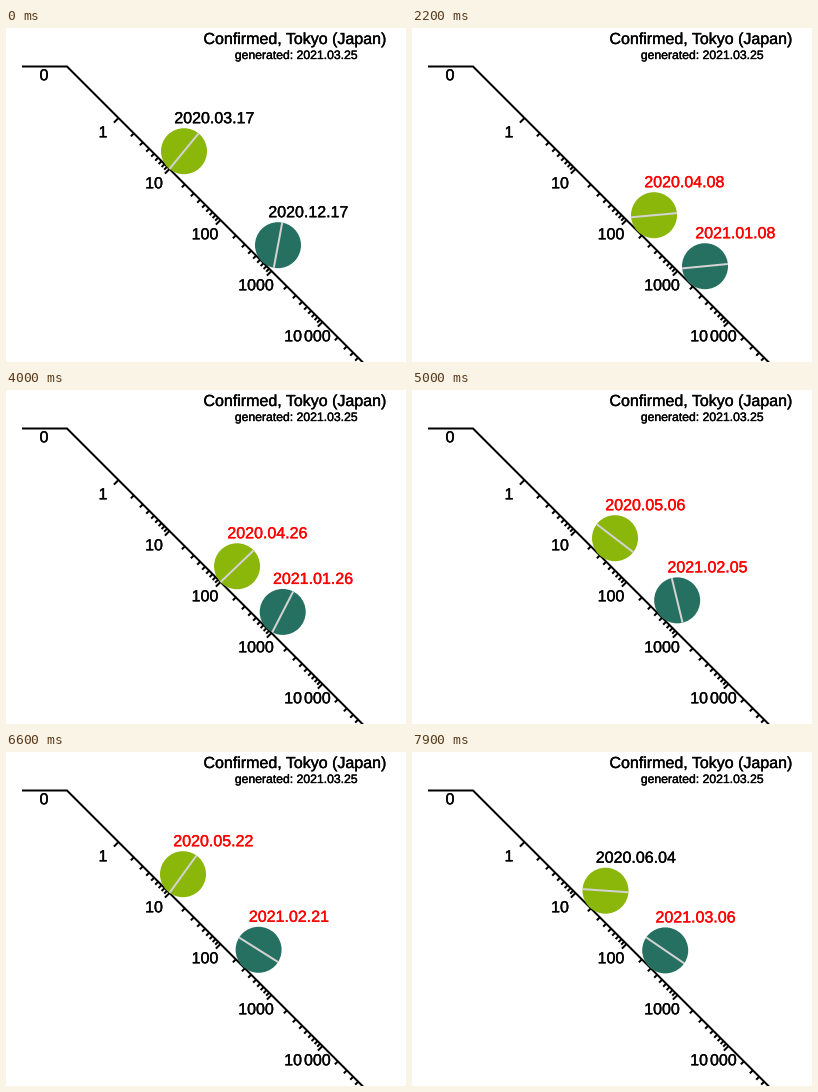
Animation of 400 by 334 pixels, one loop 8000 ms. Source, as a matplotlib script:

```python
import matplotlib.pyplot as plt
import numpy as np
from matplotlib.animation import FuncAnimation
from matplotlib.patches import Circle
from matplotlib.patheffects import withStroke

W, H, DPI = 400, 334, 100
DAYS, STEP_MS = 80, 100
PX = 72 / DPI

CORNER = (61, 38.5)    # where the axis turns downhill
ONE = 112.5            # x of the "1" tick
DECADE = 51            # x distance per factor of ten
RADIUS = 23
BALL_ONE = 128.5       # ball centre x for a value of 1
BALL_DROP = 54.8       # ball centre x minus centre y

# Turning points of each run: (day, x of the ball centre)
SPRING = [(0, 178), (1, 179.5), (3, 195.3), (5, 206), (9, 217.5), (12, 225),
          (18, 238), (22, 242), (26, 241), (36, 233.5), (45, 228), (50, 203),
          (58, 182.2), (61, 168), (66, 177), (73, 193), (76, 196), (79, 193.5)]
WINTER = [(0, 272), (12, 280.5), (14, 283.5), (17, 293.4), (19, 295.2),
          (22, 293), (28, 291), (36, 281.7), (45, 270.5), (55, 259.8),
          (60, 258), (66, 252.6), (79, 253.2)]

plt.rcParams["font.family"] = "Liberation Sans"
plt.rcParams["text.hinting"] = "none"
plt.rcParams["text.hinting_factor"] = 1

fig = plt.figure(figsize=(W / DPI, H / DPI), dpi=DPI, facecolor="white")
ax = fig.add_axes([0, 0, 1, 1])
ax.set(xlim=(0, W), ylim=(H, 0))
ax.axis("off")


def embolden(text, color):
    text.set_color(color)
    text.set_path_effects([withStroke(linewidth=0.35 * PX, foreground=color)])


def label(x, y, s, size=16, ha="center", **kw):
    text = ax.text(x, y, s, fontsize=size * PX, ha=ha, va="baseline", **kw)
    embolden(text, "black")
    return text


def stroke(xs, ys, width=2, color="black", **kw):
    return ax.plot(xs, ys, color=color, lw=width * PX,
                   solid_capstyle="butt", **kw)[0]


def slope_point(value):
    x = ONE + DECADE * np.log10(value)
    return x, x - CORNER[0] + CORNER[1]


def draw_axis():
    x0, y0 = CORNER
    stroke([16, x0, x0 + 320], [y0, y0, y0 + 320], solid_joinstyle="miter")
    label(38, y0 + 13.8, "0")
    for power in range(5):
        for k in range(1, 10):
            x, y = slope_point(k * 10 ** power)
            size = 4.6 if k == 1 else 3
            stroke([x, x - size], [y, y + size])
        x, y = slope_point(10 ** power)
        x, y = x - 15.5, y + 19.3
        if power < 4:
            label(x, y, str(10 ** power))
        else:
            label(x - 5, y, "10", ha="right")
            label(x - 3, y, "000", ha="left")


class Ball:
    def __init__(self, start, path, color, alert):
        self.start = np.datetime64(start)
        self.alert = [np.datetime64(d) for d in alert]
        self.xs = np.interp(np.arange(DAYS), *zip(*path))
        self.disc = ax.add_patch(Circle((0, 0), RADIUS, fc=color, lw=0, zorder=3))
        self.spoke = stroke([], [], color="lightgray", zorder=4)
        self.date = label(0, 0, "", ha="left", zorder=5)

    def show(self, i):
        x = self.xs[i]
        y = x - BALL_DROP
        # Rolling without slipping down a 45 degree slope
        turn = np.pi / 4 - (x - BALL_ONE) * np.sqrt(2) / RADIUS
        dx, dy = RADIUS * np.cos(turn), RADIUS * np.sin(turn)
        self.disc.center = x, y
        self.spoke.set_data([x - dx, x + dx], [y + dy, y - dy])

        day = self.start + i
        first, last = self.alert
        self.date.set_text(str(day).replace("-", "."))
        self.date.set_position((x - 9.7, y - 28))
        embolden(self.date, "red" if first <= day <= last else "black")
        return self.disc, self.spoke, self.date


draw_axis()
label(289.5, 16, "Confirmed, Tokyo (Japan)")
label(289.2, 31, "generated: 2021.03.25", size=12.2)

balls = [
    Ball("2020-03-17", SPRING, "#8bb60a", ("2020-04-07", "2020-05-25")),
    Ball("2020-12-17", WINTER, "#267061", ("2021-01-08", "2021-03-21")),
]


def update(i):
    return [part for ball in balls for part in ball.show(i)]


anim = FuncAnimation(fig, update, frames=DAYS, interval=STEP_MS,
                     repeat=True, repeat_delay=0)
plt.show()
```
